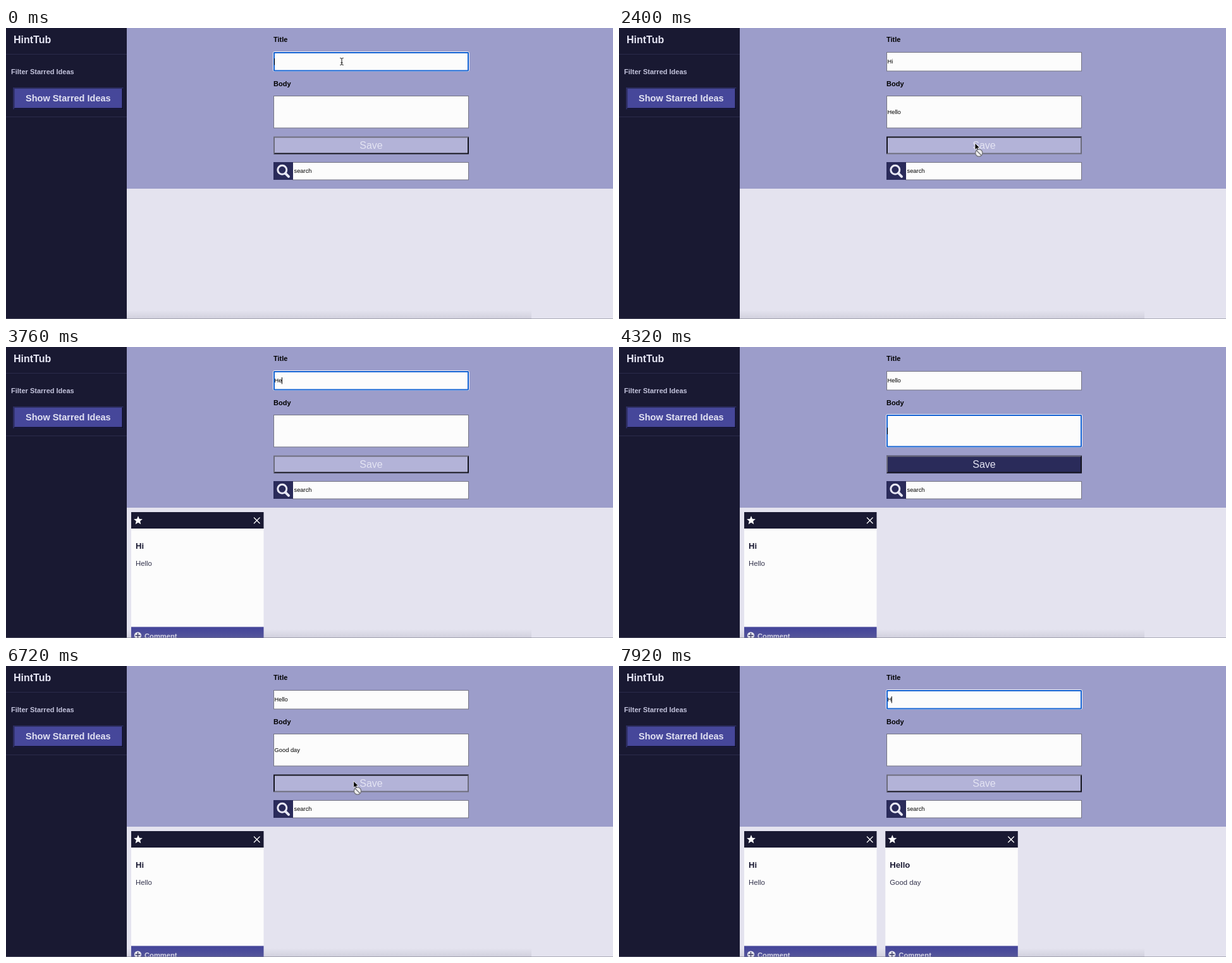
An HTML page that plays this animation: 960 by 460 pixels, repeating every 8 s.

```html
<!DOCTYPE html>
<html lang="en">
<head>
<meta charset="utf-8">
<title>Idea board</title>
<style>
html, body { margin: 0; width: 960px; height: 460px; overflow: hidden; }
svg { display: block; font-family: "Liberation Sans", Arial, Helvetica, sans-serif; }
.b { font-weight: bold; }
.in { fill: #fcfcfc; stroke: #747482; }
.small { font-size: 9.33px; }
</style>
</head>
<body>
<svg width="960" height="460" viewBox="0 0 960 460">
  <defs>
    <linearGradient id="shade" x1="0" y1="0" x2="0" y2="1">
      <stop offset="0" stop-color="#8c8c9c" stop-opacity="0"/>
      <stop offset="1" stop-color="#8c8c9c" stop-opacity=".22"/>
    </linearGradient>
    <g id="card">
      <rect x="198" y="261" width="209.5" height="26" fill="#191932"/>
      <rect x="198" y="287" width="209.5" height="155.5" fill="#fcfcfc"/>
      <rect x="198" y="442.5" width="209.5" height="18" fill="#46479a"/>
      <path id="star" fill="#fff"/>
      <path d="M392 269.5l9.5 9.5m0-9.5l-9.5 9.5" stroke="#fff" stroke-width="1.3"/>
      <circle cx="208.5" cy="456" r="5.6" fill="#f4f4fb"/>
      <path d="M204.5 456h8m-4-4v8" stroke="#2a2b5a" stroke-width="1.3"/>
      <text class="b" x="219" y="460.5" font-size="11.2" fill="#e4e4f4">Comment</text>
    </g>
  </defs>

  <rect width="960" height="460" fill="#e4e3ef"/>
  <rect x="191" width="769" height="254" fill="#9c9dca"/>
  <rect width="191" height="460" fill="#191932"/>
  <text class="b" x="12" y="24.3" font-size="16" fill="#e6e6f4">HintTub</text>
  <path d="M0 41.5h191M0 140.5h191" stroke="#2b2b4a"/>
  <text class="b" x="8" y="73" font-size="11" fill="#c3c3dc">Filter Starred Ideas</text>
  <rect x="11.5" y="94" width="174" height="34.5" fill="#46479a"/>
  <path d="M185.5 94v34.5h-174l2-2h170v-30.5z" fill="#0d0d20"/>
  <path d="M11.5 128.5v-34.5h174l-2 2h-170v30.5z" fill="#2c2d5f"/>
  <text class="b" x="98.3" y="116" font-size="14.5" text-anchor="middle" fill="#e2e2f3">Show Starred Ideas</text>

  <text class="b" x="423" y="22" font-size="11">Title</text>
  <text class="b" x="423" y="91.5" font-size="11">Body</text>
  <rect class="in" x="423.5" y="38.5" width="308" height="29.5"/>
  <rect class="in" x="423.5" y="107.5" width="308" height="50.5"/>
  <g id="ring" fill="none">
    <rect id="halo" x="422.5" width="310" rx="2" stroke="#eef1fb"/>
    <rect id="blue" x="424" width="307" rx="1" stroke="#1462d2" stroke-width="2"/>
  </g>
  <text class="small" id="title" x="424.5" y="56"></text>
  <text class="small" id="body" x="424.5" y="136"></text>
  <rect id="caret" width="1" height="10.5"/>

  <rect id="save" x="423" y="171.5" width="309" height="28"/>
  <path id="saveBR" d="M732 171.5v28h-309l2-2h305v-24z"/>
  <path id="saveTL" d="M423 199.5v-28h309l-2 2h-305v24z"/>
  <text x="577.5" y="191" font-size="16" text-anchor="middle" fill="#e4e4f3">Save</text>

  <rect class="in" x="453.5" y="212.5" width="278" height="27.5"/>
  <rect x="423" y="212" width="31" height="28" fill="#2a2b5a"/>
  <circle cx="436.8" cy="224.3" r="7" fill="none" stroke="#e8e8f5" stroke-width="3"/>
  <path d="M442 229.8l5 5" stroke="#e8e8f5" stroke-width="4" stroke-linecap="round"/>
  <text class="small" x="455.5" y="229.3">search</text>

  <g id="first">
    <use href="#card"/>
    <text class="b" x="205" y="319" font-size="13.1" fill="#191932">Hi</text>
    <text x="205" y="345.7" font-size="11.35" fill="#33334c">Hello</text>
  </g>
  <g id="second" transform="translate(223.3 0)">
    <use href="#card"/>
    <text class="b" x="205" y="319" font-size="13.1" fill="#191932">Hello</text>
    <text x="205" y="345.7" font-size="11.35" fill="#33334c">Good day</text>
  </g>
  <rect x="191" y="446" width="640" height="14" fill="url(#shade)"/>
  <rect y="459" width="960" height="1" fill="#777784" opacity=".5"/>

  <g id="mouse">
    <path id="beam" d="M-2.7 -5.5q2.2 0 2.7 1.2q.5 -1.2 2.7 -1.2M0 -4.5v9M-2.7 5.5q2.2 0 2.7 -1.2q.5 1.2 2.7 1.2M-1.5 1.8h3" fill="none" stroke="#111"/>
    <path id="arrow" d="M0 0v10.6l2.5 -2.3l1.7 3.8l1.9 -.8l-1.7 -3.7h3.3z" fill="#000" stroke="#fff" stroke-width=".8"/>
    <g id="deny" fill="#eee" stroke="#77777f" stroke-width="1.4">
      <circle cx="6.3" cy="15.5" r="5.6"/>
      <path d="M2.5 11.7l7.6 7.6"/>
    </g>
  </g>
</svg>
<script>
const $ = id => document.getElementById(id);
const LOOP = 8000, STEP = 80;

// [time, focused field, its new text]; an empty focus clears the form
const edits = [[0, 'title', '']];
const type = (field, text, times) =>
  times.forEach((t, i) => edits.push([t, field, text.slice(0, i + 1)]));
const focus = (t, field) => edits.push([t, field, '']);
const blur = t => edits.push([t, '', null]);
type('title', 'Hi', [320, 400]);
focus(560, 'body');
type('body', 'Hello', [880, 960, 1120, 1200, 1280]);
blur(2320);
focus(3020, 'title');
type('title', 'Hello', [3680, 3760, 3920, 4000, 4080]);
focus(4240, 'body');
type('body', 'Good day', [4480, 4560, 4720, 4800, 4880, 4960, 5040, 5120]);
blur(6640);
focus(7520, 'title');
type('title', 'H', [7920]);

const saves = [2480, 6800];
const path = [
  [0, 531, 53], [1680, 531, 53], [2240, 563, 182], [2480, 563, 182],
  [2880, 507.5, 58.5], [3040, 506.5, 53], [5520, 506.5, 53], [5760, 535, 120],
  [6080, 535, 120], [6480, 549.7, 182], [6800, 549.7, 182], [6960, 547, 173],
  [7200, 547, 173], [7520, 510.5, 53], [LOOP, 510.5, 53]
];
const within = (t, a, b) => t >= a && t < b;
const show = (id, on) => $(id).setAttribute('visibility', on ? 'inherit' : 'hidden');
const set = (id, attrs) => {
  for (const k in attrs) $(id).setAttribute(k, attrs[k]);
};

$('star').setAttribute('d', 'M' + Array.from({ length: 10 }, (_, i) => {
  const r = i % 2 ? 3.3 : 7.3, a = i * Math.PI / 5;
  return [209 + r * Math.sin(a), 274.3 - r * Math.cos(a)].map(v => v.toFixed(2));
}).join('L') + 'z');

function pointer(t) {
  const i = path.findIndex(p => p[0] > t);
  const [t0, x0, y0] = path[i - 1], [t1, x1, y1] = path[i];
  const u = (t - t0) / (t1 - t0), e = u * u * (3 - 2 * u);
  return [x0 + (x1 - x0) * e, y0 + (y1 - y0) * e];
}

function drawForm(t) {
  const form = { title: '', body: '' };
  const cleared = Math.max(0, ...saves.filter(s => s <= t));
  let field = '', last = 0;
  for (const [at, name, text] of edits) {
    if (at > t) break;
    field = name;
    last = at;
    if (name && at >= cleared) form[name] = text;
  }
  $('title').textContent = form.title;
  $('body').textContent = form.body;

  show('ring', field);
  const blink = Math.floor((t - last) / 500) % 2 === 0;
  show('caret', field && blink);
  if (field) {
    const top = field === 'title' ? 38 : 107, h = field === 'title' ? 30.5 : 51.5;
    set('halo', { y: top - .5, height: h + .5 });
    set('blue', { y: top + 1, height: h - 2 });
    set('caret', { x: 424 + $(field).getComputedTextLength(), y: field === 'title' ? 48 : 127.5 });
  }
}

function drawSave(t) {
  const pressed = saves.some(s => within(t, s - 160, s));
  const enabled = within(t, 560, 2320) || within(t, 4240, 6640);
  const light = '#6c6c7c', dark = '#15151f';
  set('save', { fill: enabled ? '#2a2b5a' : '#b3b3d8' });
  set('saveTL', { fill: pressed ? dark : light });
  set('saveBR', { fill: pressed ? light : dark });
  return enabled;
}

function drawMouse(t, enabled) {
  const [x, y] = pointer(t);
  const inBox = (a, b) => x > 423 && x < 732 && y > a && y < b;
  const beam = inBox(38, 68) || inBox(107, 158);
  show('mouse', !within(t, 320, 1680) && !within(t, 3680, 5520) && t < 7920);
  show('beam', beam);
  show('arrow', !beam);
  show('deny', !enabled && inBox(171, 200));
  set('mouse', { transform: `translate(${x} ${y})` });
}

function draw(now) {
  const t = Math.floor((now % LOOP) / STEP) * STEP;
  drawForm(t);
  show('first', t >= saves[0]);
  show('second', t >= saves[1]);
  drawMouse(t, drawSave(t));
}

let start;
function tick(now) {
  start ??= now;
  draw(now - start);
  requestAnimationFrame(tick);
}
draw(0);
requestAnimationFrame(tick);
</script>
</body>
</html>
```
